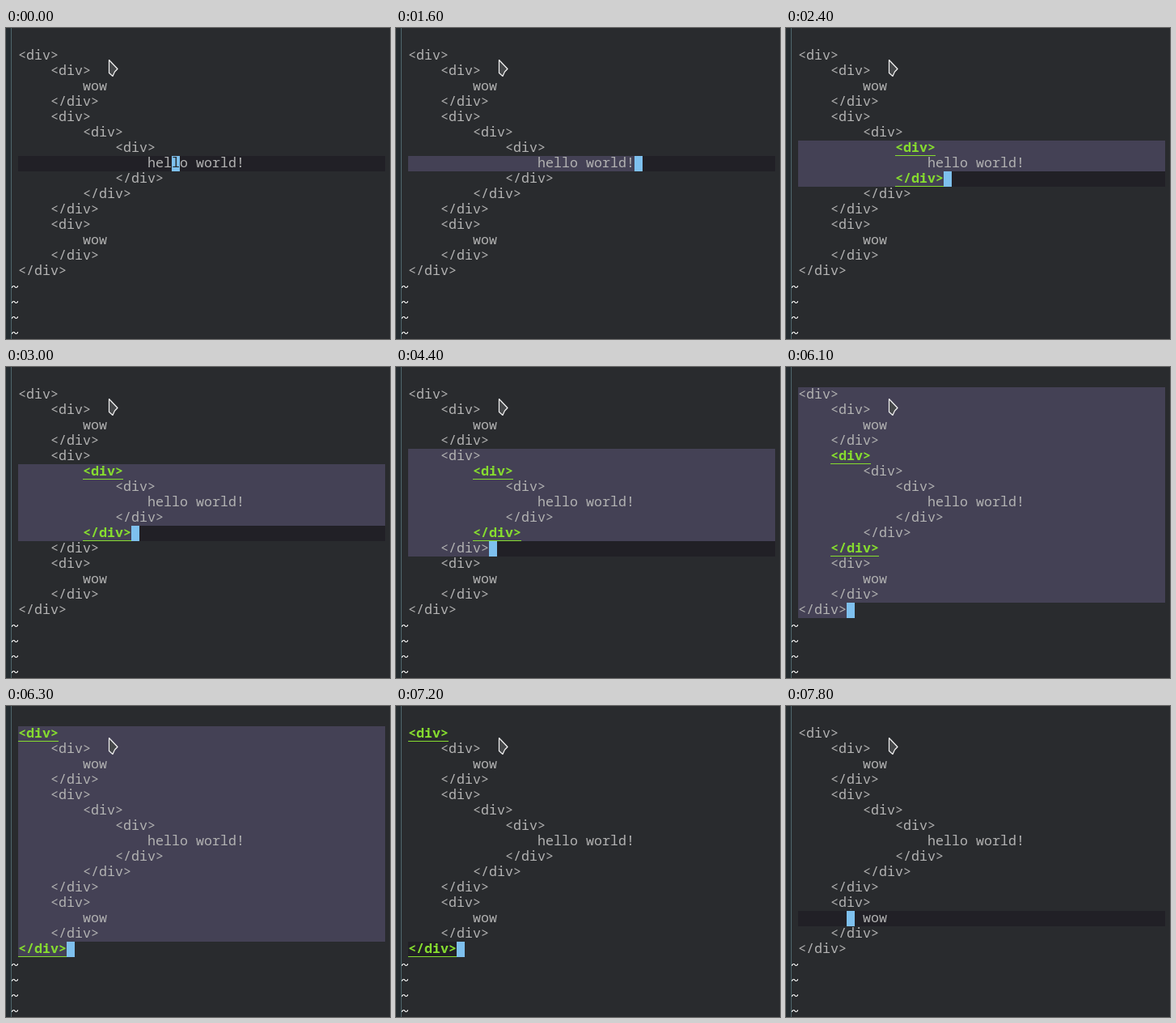
Write an HTML page that moves like this. It is 475 px wide and 384 px high and loops after 8 s.

```html
<!DOCTYPE html>
<html lang="en">
<head>
<meta charset="utf-8">
<title>Expanding a selection</title>
<style>
  html, body { margin: 0; width: 100%; height: 100%; overflow: hidden; background: #292b2e; }
  svg { display: block; width: 475px; height: 384px; }
  text { font: 16.667px "Noto Sans Mono", "DejaVu Sans Mono", monospace; fill: #b2b2b2; white-space: pre; }
  text.match { font-weight: 700; fill: #86dc2f; }
  text.under { fill: #292b2e; }
</style>
</head>
<body>
<svg id="stage" viewBox="0 0 475 384"></svg>
<script>
const LOOP = 8000, LEFT = 15, RIGHT = 469, CELL = 10, ROW = 19, BASE = 14;
const LINE = "#212026", REGION = "#444155", CURSOR = "#7ec0ee", MATCH = "#86dc2f";

// indent level and text of each buffer row
const buffer = [
  [0, ""], [0, "<div>"], [1, "<div>"], [2, "wow"], [1, "</div>"], [1, "<div>"],
  [2, "<div>"], [3, "<div>"], [4, "hello world!"], [3, "</div>"], [2, "</div>"],
  [1, "</div>"], [1, "<div>"], [2, "wow"], [1, "</div>"], [0, "</div>"]
];

// at: start time, row/col: cursor, from: first selected row,
// tags: highlighted pair, end: right edge of the current-line bar
const states = [
  { at: 0, row: 8, col: 19 },
  { at: 300, row: 8, col: 18 },
  { at: 500, row: 8, col: 17 },
  { at: 700, row: 8, col: 16 },
  { at: 1600, row: 8, col: 28, from: 8 },
  { at: 2100, row: 9, col: 18, from: 7 },
  { at: 2400, row: 9, col: 18, from: 7, tags: [7, 9] },
  { at: 2800, row: 10, col: 14, from: 6, tags: [7, 9] },
  { at: 3000, row: 10, col: 14, from: 6, tags: [6, 10] },
  { at: 4400, row: 11, col: 10, from: 5, tags: [6, 10] },
  { at: 4600, row: 11, col: 10, from: 5, tags: [5, 11] },
  { at: 6100, row: 15, col: 6, from: 1, tags: [5, 11], end: 75 },
  { at: 6300, row: 15, col: 6, from: 1, tags: [1, 15], end: 75 },
  { at: 7200, row: 15, col: 6, tags: [1, 15], end: 75 },
  { at: 7400, row: 14, col: 6, tags: [1, 15] },
  { at: 7600, row: 14, col: 6 },
  { at: 7800, row: 13, col: 6 }
];

const stage = document.getElementById("stage");
const rowY = r => 6 + ROW * r;
const colX = c => LEFT + CELL * c;

function add(parent, name, attrs, content) {
  const el = document.createElementNS("http://www.w3.org/2000/svg", name);
  for (const key in attrs) el.setAttribute(key, attrs[key]);
  if (content) el.textContent = content;
  return parent.appendChild(el);
}

function box(parent, x, y, width, height, fill) {
  return add(parent, "rect", { x, y, width, height, fill, "shape-rendering": "crispEdges" });
}

function write(parent, row, col, content, style = "") {
  add(parent, "text", { x: colX(col), y: rowY(row) + BASE, class: style }, content);
}

function drawEditor(g, s) {
  box(g, LEFT, rowY(s.row), (s.end || RIGHT) - LEFT, ROW, LINE);
  if (s.from !== undefined) {
    box(g, LEFT, rowY(s.from), RIGHT - LEFT, ROW * (s.row - s.from), REGION);
    box(g, LEFT, rowY(s.row), CELL * s.col, ROW, REGION);
  }
  buffer.forEach(([level, line], row) => {
    const lit = s.tags && s.tags.includes(row);
    write(g, row, level * 4, line, lit ? "match" : "");
    if (lit) box(g, colX(level * 4), rowY(row) + ROW - 1, CELL * line.length, 1, MATCH);
  });
  box(g, colX(s.col), rowY(s.row), CELL, ROW, CURSOR);
  const [level, line] = buffer[s.row];
  const under = line[s.col - level * 4];
  if (under) write(g, s.row, s.col, under, "under");
}

function drawFringe(g) {
  box(g, 0, 0, 6, 384, "#252c30");
  box(g, 6, 0, 1, 384, "#4f666c");
  const tilde = [0b01110001, 0b11011011, 0b10001110];
  for (let row = 16; row < 20; row++)
    tilde.forEach((bits, dy) => {
      for (let dx = 0; dx < 8; dx++)
        if (bits & (128 >> dx)) box(g, 7 + dx, rowY(row) + 8 + dy, 1, 1, "#d0d0d0");
    });
}

box(stage, 0, 0, 475, 384, "#292b2e");
const editor = add(stage, "g", {});
drawFringe(add(stage, "g", {}));
add(stage, "path", {
  d: "M127.5 39.5L138 50.5L134.5 54L132 59.5L127.5 55.5Z",
  fill: "#46484a", stroke: "#f4f4f4", "stroke-width": 1.2, "stroke-linejoin": "round"
});

let shown = null;
function render(time) {
  const t = time % LOOP;
  const state = states.filter(s => s.at <= t).pop();
  if (state !== shown) {
    editor.replaceChildren();
    drawEditor(editor, state);
    shown = state;
  }
}

const start = performance.now();
function tick() {
  render(Math.max(0, performance.now() - start));
  requestAnimationFrame(tick);
}
tick();
</script>
</body>
</html>
```
